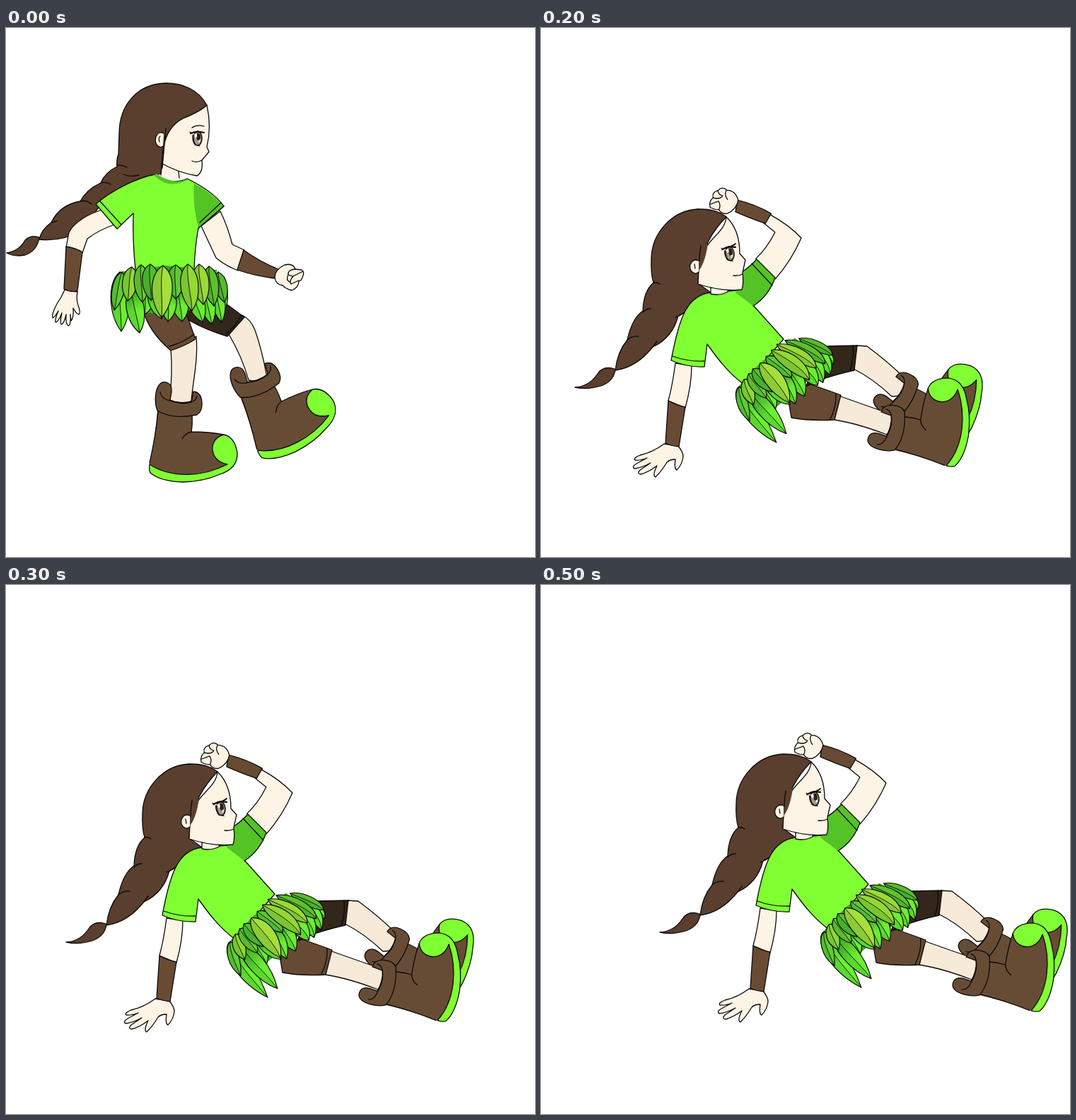
Recreate the animation shown at these times as an HTML page with a canvas. Size 748 by 748 pixels, loop 0.6 s.

```html
<!DOCTYPE html>
<html lang="en">
<head>
<meta charset="utf-8">
<title>Slide</title>
<style>
html, body { margin: 0; width: 100%; height: 100%; overflow: hidden; background: #fff; }
canvas { display: block; }
</style>
</head>
<body>
<canvas id="stage" width="748" height="748"></canvas>
<script>
const ctx = document.getElementById('stage').getContext('2d');
const INK = '#0c0a08', HAIR = '#5a3e2e', SKIN = '#fdf4e6', LEG = '#f8ead8', GREEN = '#80ff32',
  SHADE = '#54c325', BOOT = '#674c35', CUFF = '#694b34', NEAR = '#674a34', FAR = '#33261b';

function fill(color, d) {
  ctx.fillStyle = color;
  ctx.fill(new Path2D(d));
}
function line(d, w = 1.3) {
  ctx.lineWidth = w;
  ctx.strokeStyle = INK;
  ctx.stroke(new Path2D(d));
}
function shape(color, d) {
  fill(color, d);
  line(d);
}
function shifted(x, y, draw) {
  ctx.save();
  ctx.translate(x, y);
  draw();
  ctx.restore();
}

// Rotate and scale so that points a, b land on p, q.
function place(a, b, p, q, draw) {
  const ux = b[0] - a[0], uy = b[1] - a[1], vx = q[0] - p[0], vy = q[1] - p[1];
  const n = ux * ux + uy * uy;
  const c = (ux * vx + uy * vy) / n, s = (ux * vy - uy * vx) / n;
  ctx.save();
  ctx.transform(c, s, -s, c, p[0] - c * a[0] + s * a[1], p[1] - s * a[0] - c * a[1]);
  draw();
  ctx.restore();
}

function drawBoot() {
  fill(BOOT, 'M214 540Q211 580 203 615L204 627Q241 640 312 621Q325 590 305 575Q285 571 263 571L263 545Z');
  line('M215 543Q212 575 203 615M263 547Q264 560 262 571Q288 571 308 575M263 571Q254 572 249 581');
  shape(GREEN, 'M308 575C293 579 289 592 294 604Q299 614 313 617C280 634 235 638 203 617Q202 624 204 629Q218 641 250 642Q280 641 300 632C320 626 328 614 327 600Q323 578 308 575Z');
  shape(BOOT, 'M218 503C211 510 209 528 214 541Q235 554 270 547Q278 542 277 529Q276 515 265 514L262 529Q246 532 232 526L234 515Q235 505 229 502Q222 499 218 503Z');
  line('M218 515Q219 524 232 527Q250 534 264 528Q270 525 270 520');
}
function boot(heel, toe) {
  place([203, 618], [309, 597], heel, toe, drawBoot);
}

function drawHand() {
  shape(SKIN, 'M83 370L101 373Q99 383 102 392Q106 403 103 405Q99 404 95 396Q96 410 92 414L91 405Q92 420 88 421Q84 419 85 405Q82 419 78 419Q76 416 79 403Q74 416 70 416Q69 412 74 400Q69 409 66 410Q64 405 72 390Q79 380 83 370Z');
  shape(CUFF, 'M85 309Q98 311 108 317L101 372Q91 374 82 369Z');
}

function drawRaisedArm() {
  shape(SKIN, 'M348 148Q374 167 388 187Q370 217 344 240L320 208Q338 195 352 174L337 158Z');
  shape(CUFF, 'M305 122Q329 131 350 147L340 160Q318 149 300 138Z');
  shape(SKIN, 'M277 132Q280 139 288 139Q302 135 306 122Q304 108 292 106Q286 99 279 105Q270 106 271 114Q264 119 265 127Q272 132 277 132Z');
  line('M271 114Q279 118 284 114M279 105Q279 111 285 113M265 123L278 120Q281 126 277 132M291 106Q287 112 291 119');
}

function eye(x, y, angle) {
  ctx.save();
  ctx.translate(x, y);
  ctx.rotate(angle);
  ctx.beginPath();
  ctx.ellipse(1, 0, 6, 10, 0, 0, 7);
  ctx.fillStyle = '#a5978c';
  ctx.fill();
  ctx.lineWidth = 1.5;
  ctx.stroke();
  fill('#2a2019', 'M-1 -7Q6 -9 5 0Q3 5 0 2Z');
  fill('#fff', 'M-4 -6L0 -7L0 -2L-3 -1ZM2 3L5 2L3 7Z');
  line('M-9 -7Q0 -11 10 -8', 2.1);
  line('M-7 -7L-10 -9M-6 -5Q-7 3 -3 9L4 11', 1.1);
  ctx.restore();
}

// Leaves: root x, root y, tip x, tip y, half width.
const LOWER = [
  [161, 345, 163, 429, 14], [302, 350, 308, 402, 9], [296, 358, 305, 416, 10], [200, 365, 196, 405, 12],
  [178, 368, 189, 431, 13], [280, 362, 291, 419, 11], [262, 365, 278, 416, 12], [206, 366, 220, 411, 11],
  [245, 368, 249, 415, 12], [232, 370, 229, 415, 11]
];
const UPPER = [
  [164, 345, 153, 399, 9], [300, 345, 309, 388, 9], [178, 338, 172, 386, 11], [287, 337, 294, 393, 11],
  [191, 335, 193, 388, 11], [273, 334, 279, 391, 12], [204, 334, 205, 385, 12], [240, 335, 240, 383, 12],
  [257, 334, 263, 400, 13], [222, 336, 220, 409, 15]
];
const TINTS = ['#5fce30', '#56bd2c', '#8ed933', '#5cc22c', '#6bcb30', '#9bd935', '#55bf2c', '#5dca32', '#94d832', '#a5df38'];

// The skirt bends between three rows: waist, middle and hem, each [left, right].
function skirt(waist, middle, hem) {
  const at = (x, y) => {
    const u = (x - 147) / 164, v = (y - 333) / 98;
    const along = (row, i) => row[0][i] + u * (row[1][i] - row[0][i]);
    return [0, 1].map(i => (2 * v - 1) * (v - 1) * along(waist, i) +
      4 * v * (1 - v) * along(middle, i) + v * (2 * v - 1) * along(hem, i));
  };
  function leaf([x0, y0, x1, y1, w], tint, edge) {
    const dx = x1 - x0, dy = y1 - y0, n = Math.hypot(dx, dy);
    const pt = (k, o) => at(x0 + k * dx - o * w * dy / n, y0 + k * dy + o * w * dx / n).join(' ');
    const left = `M${pt(0, 0)}C${pt(.15, 1.3)} ${pt(.7, 1.3)} ${pt(1, 0)}`;
    const right = `C${pt(.75, -1.1)} ${pt(.2, -1.4)} ${pt(0, 0)}`;
    const rib = `C${pt(.7, -.1)} ${pt(.3, .3)} ${pt(0, 0)}`;
    const g = ctx.createLinearGradient(...at(x0, y0), ...at(x1, y1));
    g.addColorStop(0, edge);
    g.addColorStop(.5, tint);
    g.addColorStop(1, tint);
    fill(g, left + right);
    ctx.globalAlpha = .16;
    fill('#063', left + rib);
    ctx.globalAlpha = 1;
    line(left + right, 1.2);
    line(`M${pt(1, 0)}${rib}`, .9);
  }
  const base = [[160, 345], [225, 336], [298, 342], [302, 395], [230, 402], [166, 405]];
  fill('#3fa326', 'M' + base.map(p => at(...p).join(' ')).join('L') + 'Z');
  LOWER.forEach(l => leaf(l, '#6cee31', '#379a20'));
  UPPER.forEach((l, i) => leaf(l, TINTS[i], TINTS[i]));
}

function stride() {
  shape(HAIR, 'M47 296Q35 292 27 300Q19 315 1 318Q12 324 27 321Q44 315 47 297Z');
  shape(HAIR, 'M284 109C272 87 250 78 226 78C186 79 160 108 160 150L159 178Q156 186 157 196Q140 204 134 219Q114 228 105 245Q76 250 64 275Q50 285 47 299Q80 302 103 288Q122 268 130 255L190 215L219 206L222 170Q228 140 250 128Q275 118 284 109Z');
  line('M157 194Q164 193 171 197M134 219Q142 217 148 221M105 245Q114 243 121 249M166 207Q176 211 188 208M64 275L72 273');

  shape(SKIN, 'M136 257C116 263 96 275 89 289L85 310L108 318L115 298Q130 286 156 277Z');
  drawHand();

  shape(SKIN, 'M276 280L297 325Q310 336 328 343L337 314L320 306Q314 282 303 259Z');
  shape(CUFF, 'M336 314Q358 330 385 341L379 354Q350 350 327 342Z');
  shape(SKIN, 'M380 352Q381 341 394 335Q406 332 409 341L418 342Q423 345 419 353Q417 358 414 358Q414 367 404 371Q396 369 391 364Q381 363 380 352Z');
  line('M409 341Q398 342 399 349L406 351L420 344M406 351Q400 358 403 362L414 357M399 349Q395 356 402 360');

  shape(LEG, 'M315 433Q334 465 343 498Q360 502 369 494Q362 455 352 427Q346 412 334 406Z');
  shape(FAR, 'M250 395L258 413Q285 428 313 436L337 409L306 386Z');
  line('M311 433Q325 421 332 407');
  boot([356, 598], [444, 531]);
  shape(LEG, 'M233 453Q236 490 231 526Q246 532 262 528C264 500 272 470 269 436Z');
  shape(NEAR, 'M193 395Q200 428 233 456Q250 451 268 440L265 432L252 395Z');
  line('M231 450Q250 445 266 433');
  boot([203, 618], [309, 597]);

  fill(SKIN, 'M221 190L219 208Q232 224 245 212L244 202Z');
  line('M221 190L219 208M244 203L245 212');
  shape(GREEN, 'M210 207C185 212 150 229 127 249L157 284L180 262C179 290 180 312 183 342L266 342Q267 310 272 283L308 252C295 234 275 222 256 213Q235 223 210 207Z');
  fill(SHADE, 'M266 220Q290 232 307 252L272 282C267 262 264 240 266 220ZM209 208Q230 230 258 214Q235 222 213 206Z');
  line('M133 245L163 278M274 275L304 247M272 283L308 252');
  skirt([[147, 333], [311, 333]], [[147, 382], [311, 382]], [[147, 431], [311, 431]]);

  shape(SKIN, 'M284 109Q291 140 284 168L287 175L277 187Q279 204 270 209Q245 205 221 192L223 168Q228 140 250 128Q275 118 284 109Z');
  shape(SKIN, 'M223 149C213 144 209 157 213 165Q218 171 222 167');
  line('M218 153Q215 155 217 161M226 142L221 198M263 141Q270 136 280 139M263 188Q270 191 277 187');
  eye(270, 156, 0);
}

function leap() {
  shape(HAIR, 'M62 320Q52 322 51 333Q32 346 12 336Q20 350 38 351Q59 349 63 322Z');
  shape(HAIR, 'M279 153C268 138 250 133 233 135C190 137 165 165 165 203Q166 224 172 236Q152 246 148 253Q118 255 103 283Q84 288 79 297Q66 307 61 320Q85 322 100 316Q122 312 133 303Q148 309 170 304L195 275L236 256L227 243L229 228Q238 200 279 153Z');
  line('M148 253Q158 248 168 253M103 283L115 278M79 297L87 295M130 304L141 305');

  shape(SKIN, 'M165 324C144 345 129 368 127 392L149 403Q160 372 188 345Z');
  shifted(39, 84, drawHand);
  drawRaisedArm();

  shape(LEG, 'M380 458Q405 480 432 506Q447 508 459 500L449 475Q425 452 400 434Z');
  shape(FAR, 'M310 425Q345 448 380 461L400 434Q380 418 354 404Z');
  line('M375 459Q387 446 393 429');
  boot([499, 583], [540, 481]);
  shape(LEG, 'M326 479Q350 502 378 536Q392 537 400 526Q375 477 344 454Z');
  shape(NEAR, 'M264 450Q290 470 325 481L344 457L312 423Z');
  line('M320 478Q334 466 339 451');
  boot([423, 619], [480, 526]);

  shape(GREEN, 'M235 256C200 261 178 292 159 318L195 349L213 322Q219 350 230 382L316 355C306 335 302 310 302 278L289 254Z');
  fill(SHADE, 'M290 234C300 222 310 215 321 208L344 239Q325 265 301 278L288 257Z');
  line('M290 234C300 222 310 215 321 208L344 239Q325 265 301 278M314 213L339 246M163 313L200 342');
  skirt([[203, 376], [337, 345]], [[199, 436], [358, 399]], [[217, 493], [356, 444]]);

  shape(SKIN, 'M233 246Q240 263 262 255L261 250Z');
  shape(SKIN, 'M279 153C288 165 293 190 290 208L298 217L290 234Q291 248 289 256Q255 253 227 243L228 228Q231 212 240 198C250 182 273 173 279 153Z');
  fill(HAIR, 'M238 190Q236 220 213 232Q232 230 241 205Z');
  shape(SKIN, 'M229 208C220 203 216 213 219 220Q224 226 229 221');
  line('M237 190Q236 221 211 232M278 236Q285 238 290 234');
  line('M273 195Q279 195 285 190', 1.8);
  eye(277, 204, -.12);
}

function slide() {
  shape(HAIR, 'M104 482Q88 477 80 489Q68 507 48 508Q65 512 85 506Q102 500 105 484Z');
  shape(HAIR, 'M262 267C250 258 238 256 222 256C185 258 157 290 156 325Q155 348 159 360Q145 372 144 400Q129 410 122 441Q108 458 105 484Q135 480 158 451Q186 438 194 407Q218 395 240 374L222 361L224 340Q230 300 262 267Z');
  line('M159 360Q164 359 168 362M144 402Q148 397 155 397M122 441Q129 435 138 436M158 451L164 443M190 409Q204 405 213 392');

  shape(SKIN, 'M190 474Q186 505 180 527L204 537Q213 505 213 477Z');
  shape(SKIN, 'M174 588L194 591Q201 600 201 606Q200 617 192 625Q188 624 190 610Q182 610 178 614Q171 626 162 635Q157 633 164 619Q152 628 141 631Q135 630 140 625L155 615Q142 622 132 623Q128 620 135 616L150 608Q140 612 133 611Q130 608 140 604Q158 600 174 588Z');
  shape(CUFF, 'M180 527Q190 533 204 536L195 592Q184 591 176 587Z');
  place([285, 121], [388, 187], [258, 245], [368, 297], drawRaisedArm);

  shape(LEG, 'M442 482Q470 496 496 521Q514 521 519 507L510 491Q488 470 461 450L446 449Z');
  shape(FAR, 'M375 506Q402 493 443 484L447 449L398 450Z');
  line('M437 485Q443 466 441 449');
  boot([566, 596], [596, 492]);
  shape(LEG, 'M415 554Q447 559 489 575Q501 565 501 548Q460 534 421 520Z');
  shape(NEAR, 'M348 516L354 551Q380 556 415 554L424 519Q405 512 382 504Z');
  line('M409 553Q418 536 417 517');
  boot([574, 619], [569, 512]);

  shape(GREEN, 'M240 374C208 378 196 405 184 470Q206 480 231 479L235 447C250 468 265 488 287 504L343 440L300 392L276 371Z');
  fill(SHADE, 'M284 345Q295 338 305 327L331 353Q322 379 300 393L275 374Z');
  line('M284 345Q295 338 305 327L331 353Q322 379 300 393M298 333L327 364M186 464Q208 472 231 471');
  skirt([[272, 510], [350, 428]], [[278, 542], [411, 457]], [[328, 598], [402, 503]]);

  shape(SKIN, 'M240 367L240 376Q253 379 264 373L265 368Z');
  shape(SKIN, 'M262 267Q281 285 281 319L289 328L285 346Q287 361 284 370Q255 373 222 362L223 342Q225 325 233 311C240 297 261 286 262 267Z');
  fill(HAIR, 'M225 308Q224 335 217 349Q231 340 236 305Z');
  shape(SKIN, 'M223 329C214 325 208 335 212 343Q217 350 223 345');
  line('M226 308Q224 318 224 330M217 334L218 340M272 350Q279 351 285 348');
  line('M262 310Q269 310 275 305', 1.8);
  eye(266, 319, -.12);
}

const glide = (x, y) => () => shifted(x, y, slide);
const poses = [stride, leap, slide, glide(37, -3), glide(65, -9), glide(120, -17)];
const start = performance.now();
let shown = -1;

function tick() {
  const step = Math.floor((performance.now() - start) / 100) % poses.length;
  if (step !== shown) {
    shown = step;
    ctx.fillStyle = '#fff';
    ctx.fillRect(0, 0, 748, 748);
    ctx.lineJoin = ctx.lineCap = 'round';
    ctx.strokeStyle = INK;
    poses[step]();
  }
  requestAnimationFrame(tick);
}
tick();
</script>
</body>
</html>
```
